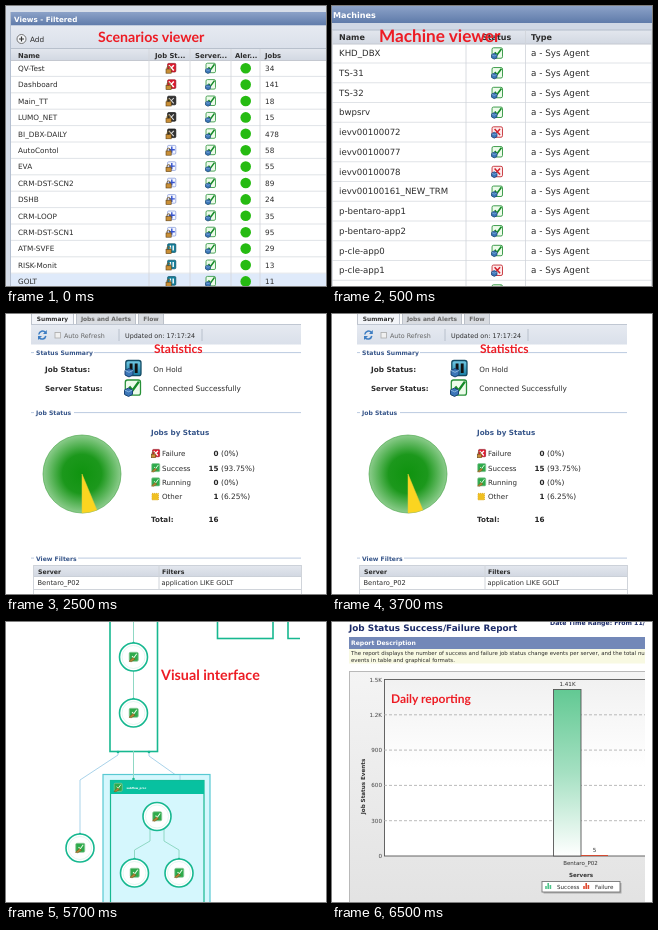
An HTML page for the animation above (8000 ms loop, 320 px wide and 280 px high).

```html
<!DOCTYPE html>
<html lang="en">
<head>
<meta charset="utf-8">
<style>
html, body { margin: 0; width: 100%; height: 100%; overflow: hidden; background: #fff; }
svg { display: block; width: 320px; height: 280px; }
text { font-family: "DejaVu Sans", sans-serif; text-rendering: geometricPrecision; white-space: pre; }
.b { font-weight: bold; }
.cap { font-family: Lato, sans-serif; font-weight: bold; }
</style>
</head>
<body>
<svg id="stage" viewBox="0 0 320 280"></svg>
<script>
const rect = (x, y, w, h, fill, more = '') =>
  `<rect x="${x}" y="${y}" width="${w}" height="${h}" fill="${fill}" ${more}/>`;
const line = (x1, y1, x2, y2, color, more = '') =>
  `<path d="M${x1} ${y1}L${x2} ${y2}" stroke="${color}" fill="none" ${more}/>`;
const path = (d, color, width = 1, fill = 'none') =>
  `<path d="${d}" stroke="${color}" stroke-width="${width}" fill="${fill}"/>`;
const circle = (x, y, r, fill, more = '') =>
  `<circle cx="${x}" cy="${y}" r="${r}" fill="${fill}" ${more}/>`;
const text = (x, y, size, s, fill = '#2c2c2c', more = '') =>
  `<text x="${x}" y="${y}" font-size="${size}" fill="${fill}" ${more}>${s}</text>`;
const bold = (x, y, size, s, fill = '#2c2c2c', more = '') => text(x, y, size, s, fill, 'class="b" ' + more);
const caption = (x, y, size, s) => text(x, y, size, s, '#ed1c24', 'class="cap"');
const icon = (id, x, y, scale = 1) => `<use href="#${id}" transform="translate(${x} ${y}) scale(${scale})"/>`;
const mid = 'text-anchor="middle"', end = 'text-anchor="end"';

const stops = colors =>
  colors.map((c, i) => `<stop offset="${i / (colors.length - 1)}" stop-color="${c}"/>`).join('');
const gradient = (id, ...colors) => `<linearGradient id="${id}" x2="0" y2="1">${stops(colors)}</linearGradient>`;

// Icons are centred on 0,0 and about 10 px wide.
const tile = (fill, edge) => rect(-4.5, -5, 9.5, 9.5, fill, `rx="1.4" stroke="${edge}" stroke-width=".8"`);
const lockTile = (fill, edge) => rect(-3.4, -4.8, 8.2, 8.6, fill, `rx="1" stroke="${edge}" stroke-width=".7"`);
const lock = path('M-4 1V-.4a1.6 1.6 0 0 1 3.2 0V1', '#7a5c22', .9) +
  rect(-5, .8, 5.2, 4.2, '#c98f36', 'stroke="#5e3f12" stroke-width=".6"');
const cube = path('M-5 1.2L-2.5 0L0 1.2V4L-2.5 5.3L-5 4Z', '#173e70', .6, '#3c76b8') +
  path('M-5 1.2L-2.5 2.4L0 1.2', '#9cc4e8', .5);
const cross = 'M-2.2 -3L2.8 2.4M2.8 -3L-2.2 2.4';
const symbols = {
  failed: lockTile('#e0182d', '#8d1420') + path(cross, '#fff', 1.5) + lock,
  stopped: lockTile('#333', '#111') + path(cross, '#ddd', 1.1) + lock,
  idle: lockTile('#f4f7ff', '#7d92d6') + path('M.8 -3.6V2.6M-2.2 -.5H3.8', '#3453cf', 1.4) + lock,
  held: lockTile('#16809c', '#0b4c62') + path('M-.6 -3V2M2.2 -3V2', '#fff', 1.4) + lock,
  pause: tile('url(#teal)', '#124a63') + path('M-1.2 -3.2V2.8M2 -3.2V2.8', '#111', 1.8) + cube,
  up: tile('#edfbea', '#289138') + path('M-2 -1L0 1.5L4 -4', '#168a28', 1.5) + cube,
  down: tile('#fdeaea', '#c42b33') + path(cross, '#d3202c', 1.4) + cube,
  job: tile('#2eaa4b', '#8dc99a') + path('M-1.5 -1L.2 1L3.4 -3.4', '#e8ffe8', 1.1) +
    path('M-4.8 4.6L-.5 .6L1.6 2.4L-2.4 5Z', '#6b4a12', .5, '#b58436')
};

const defs = '<defs>' +
  gradient('bar', '#8ca2c8', '#5f7baa') +
  gradient('head', '#e3e7ee', '#d2d8e2') +
  gradient('tool', '#e6eaf1', '#dae0ea') +
  gradient('teal', '#75cce6', '#177ca3') +
  gradient('column', '#62c993', '#a5e0c2', '#fff') +
  gradient('plot', '#f1f1f1', '#fff', '#fff') +
  gradient('panel', '#f4f4f4', '#e2e2e2') +
  `<radialGradient id="pie">${stops(['#0f930f', '#1c981c', '#8ccc8c'])}</radialGradient>` +
  Object.entries(symbols).map(([id, s]) => `<g id="${id}">${s}</g>`).join('') +
  '<clipPath id="page"><path d="M16 0H313V280H16Z"/></clipPath></defs>';

function scenarios() {
  const rows = [
    ['QV-Test', 34, 'failed'], ['Dashboard', 141, 'failed'], ['Main_TT', 18, 'stopped'],
    ['LUMO_NET', 15, 'stopped'], ['BI_DBX-DAILY', 478, 'stopped'], ['AutoContol', 58, 'idle'],
    ['EVA', 55, 'idle'], ['CRM-DST-SCN2', 89, 'idle'], ['DSHB', 24, 'idle'], ['CRM-LOOP', 35, 'idle'],
    ['CRM-DST-SCN1', 95, 'idle'], ['ATM-SVFE', 29, 'held'], ['RISK-Monit', 13, 'held'], ['GOLT', 11, 'held']
  ];
  let s = rect(0, 0, 320, 280, '#d6dde8') + rect(4, 6, 316, 13.5, 'url(#bar)') +
    bold(8, 15.6, 7.2, 'Views - Filtered', '#fff') +
    rect(4, 19.5, 316, 23, 'url(#tool)') + rect(4, 42.5, 316, 12, 'url(#head)') +
    rect(4, 54.5, 316, 226, '#fff') + line(4, 42.5, 320, 42.5, '#b8c0cc') + line(4, 54.5, 320, 54.5, '#c4c8d0') +
    circle(15.5, 33, 4.5, '#f3f5f8', 'stroke="#666" stroke-width=".9"') +
    path('M13 33H18M15.5 30.5V35.5', '#333', 1.2) + text(24, 35.6, 7.3, 'Add');
  [[12, 'Name'], [149, 'Job St...'], [189, 'Server...'], [229, 'Aler...'], [259, 'Jobs']]
    .forEach(([x, h]) => s += bold(x, 51.5, 6.8, h));
  rows.forEach(([name, jobs, state], i) => {
    const y = 62.2 + i * 16.4;
    if (i == 13) s += rect(4, y - 7.7, 316, 16, '#dfeafa');
    s += line(4, y + 8.2, 320, y + 8.2, '#d9dce1', 'stroke-width=".8"') +
      text(12, y + 2.7, 7.3, name) + text(259, y + 2.7, 7.3, jobs) +
      icon(state, 165, y) + icon('up', 204.5, y) + circle(239.7, y, 5.3, '#26bb12');
  });
  [143, 184, 225, 254].forEach(x => s += line(x, 43, x, 280, '#d2d5da', 'stroke-width=".8"'));
  return s + line(4.5, 6, 4.5, 280, '#b4bfd0') + caption(92, 35.7, 14.2, 'Scenarios viewer');
}

function machines() {
  const names = ['KHD_DBX', 'TS-31', 'TS-32', 'bwpsrv', 'ievv00100072', 'ievv00100077', 'ievv00100078',
    'ievv00100161_NEW_TRM', 'p-bentaro-app1', 'p-bentaro-app2', 'p-cle-app0', 'p-cle-app1', 'p-cle-app2'];
  let s = rect(0, 0, 320, 280, '#fff') + rect(0, 0, 320, 17, 'url(#bar)') +
    bold(1, 11.5, 8.1, 'Machines', '#fff') + rect(0, 17, 320, 7, '#d0d8e5') +
    rect(0, 24, 320, 14, 'url(#head)') + line(0, 24, 320, 24, '#b4bdcb') + line(0, 38, 320, 38, '#c4c8d0');
  [[7, 'Name'], [150, 'Status'], [199, 'Type']].forEach(([x, h]) => s += bold(x, 34, 8, h));
  names.forEach((name, i) => {
    const y = 47 + i * 19.75;
    s += line(0, y + 10, 320, y + 10, '#d9dce1', 'stroke-width=".8"') + text(7, y + 3, 8.6, name) +
      text(199, y + 3, 8.8, 'a - Sys Agent') + icon([4, 6, 11].includes(i) ? 'down' : 'up', 165, y + .3, 1.1);
  });
  [134, 193.5, 319.5, .5].forEach(x => s += line(x, 24, x, 280, '#d0d4da', 'stroke-width=".8"'));
  return s + caption(47, 35.7, 17.2, 'Machine viewer');
}

function statistics() {
  const navy = '#37568a';
  const section = (y, name, w) => line(25, y - 2.4, 295, y - 2.4, '#a9bcd8', 'stroke-width=".8"') +
    rect(28, y - 5, w + 3, 6, '#fff') + bold(30, y, 6.1, name, navy);
  const tab = (x, w, fill, name, ink) => rect(x, -3, w, 13.5, fill, 'stroke="#b0b6c0" stroke-width=".8"') +
    bold(x + w / 2, 7, 5.9, name, ink, mid);
  let s = rect(0, 0, 320, 280, '#fff') + tab(70.5, 59, '#d9dce1', 'Jobs and Alerts', '#666') +
    tab(132.5, 25, '#d9dce1', 'Flow', '#666') + tab(25.5, 42, '#f3f5f9', 'Summary', '#333') +
    rect(25, 10.5, 270, 20, 'url(#tool)') + line(25, 10.5, 295, 10.5, '#c0c7d2') +
    path('M32.8 20.5A3.8 3.8 0 0 1 39.5 18.5M39.8 22A3.8 3.8 0 0 1 33 23.5', '#3d7dc2', 1.5) +
    path('M40.8 16V20H37ZM32 26V22H36Z', 'none', 0, '#3d7dc2') +
    rect(49, 18.5, 5.5, 5.5, '#f0f0f0', 'stroke="#aaa" stroke-width=".8"') +
    text(58, 23.7, 6.35, 'Auto Refresh', '#666') + line(113, 15, 113, 27, '#b8c0cc') +
    text(119, 23.7, 6.4, 'Updated on: 17:17:24') + line(196, 15, 196, 27, '#b8c0cc') +
    section(41, 'Status Summary', 57) + section(101, 'Job Status', 37) + section(246.5, 'View Filters', 41) +
    bold(39, 58, 7.3, 'Job Status:') + bold(39, 77, 7.1, 'Server Status:') +
    icon('pause', 127, 54.5, 1.6) + icon('up', 126.5, 74, 1.6) +
    text(147.3, 58, 7.2, 'On Hold') + text(147.3, 77, 7.4, 'Connected Successfully') +
    circle(76, 160, 39, 'url(#pie)', 'stroke="#3f9f3f" stroke-width=".6"');
  const a = Math.PI * 3 / 8;
  s += path(`M76 160V199A39 39 0 0 0 ${76 + 39 * Math.cos(a)} ${160 + 39 * Math.sin(a)}Z`, '#e6c83a', .5, '#fbd520') +
    bold(145, 120.5, 7.2, 'Jobs by Status', navy);
  [['Failure', 0, '0%', 'failed'], ['Success', 15, '93.75%', 'job'], ['Running', 0, '0%', 'job'], ['Other', 1, '6.25%']]
    .forEach(([name, n, share, id], i) => {
      const y = 139.5 + i * 14.3;
      s += (id ? icon(id, 149.5, y, .85) : rect(146, y - 3, 6.5, 6.5, '#f0c020', 'stroke="#e0b030" stroke-dasharray="1"')) +
        text(156, y + 2.7, 7.1, name) + bold(212.5, y + 2.7, 7.2, n, '#222', end) +
        text(215, y + 2.7, 7.4, `(${share})`);
    });
  return s + bold(145, 208, 7.2, 'Total:') + bold(212.5, 208, 7.2, 16, '#222', end) +
    rect(27.5, 251.5, 268, 11, 'url(#head)', 'stroke="#c4cad3" stroke-width=".8"') +
    bold(32, 259.5, 6.2, 'Server') + bold(156, 259.5, 6.2, 'Filters') +
    text(31.5, 271, 6.7, 'Bentaro_P02') + text(155.5, 271, 6.6, 'application LIKE GOLT') +
    line(27, 275.5, 295, 275.5, '#d0d4da') + line(153, 251, 153, 276, '#d0d4da') +
    line(27.5, 251, 27.5, 280, '#d0d4da') + line(295.5, 251, 295.5, 280, '#d0d4da') +
    caption(148, 39.3, 12, 'Statistics');
}

function flow() {
  const green = '#17b890', link = '#8fd8c4', pale = '#a9d3ea';
  const frame = `stroke="${green}" stroke-width="1.6"`;
  const node = (x, y) => circle(x, y, 14, '#fff', frame) +
    circle(x, y, 11.5, 'none', 'stroke="#d7f2ea" stroke-width=".7"') + icon('job', x, y, .95);
  const dot = (x, y) => circle(x, y, 1.3, green);
  return rect(0, 0, 320, 280, '#fff') +
    rect(104, -5, 47.5, 134.5, '#fff', frame) + rect(211.5, -5, 55.5, 21.5, '#fff', frame) +
    path('M282 -2V16.5H294', green, 1.6) +
    path('M127.5 0V21M127.5 49V77', link) + dot(127.5, 21) + dot(127.5, 77) +
    path('M112 130V133L74 158V212', pale) + path('M143 130V134L174 156V158', pale) +
    rect(97, 152.5, 107, 140, '#d5f7fd', 'stroke="#58c9d2" stroke-width="1.2"') +
    path('M127.5 129V158', link) + path('M174 153V158', pale) +
    rect(104.5, 158.5, 93.5, 140, '#d5f7fd', `stroke="${green}" stroke-width="1.2"`) +
    rect(104.5, 158.5, 93.5, 13.5, '#08c1a0') + icon('job', 112, 165.5, .85) +
    bold(120.5, 166.7, 2.7, 'subflow_proc', '#fff') +
    path('M144 206V219L128.5 228V237M158 206V219L173 228V237', link) +
    dot(128.5, 237) + dot(173, 237) + dot(112, 130) + dot(143, 130) + dot(127.5, 157) + dot(74, 212) +
    node(127.5, 35) + node(127.5, 91) + node(74, 226) + node(151, 194.5) + node(128.5, 251) + node(173, 251) +
    caption(155, 57.5, 14.3, 'Visual interface');
}

function report() {
  const key = (x, color) => path(`M${x} 267V264M${x + 2.2} 267V261M${x + 4.4} 267V263`, color, 1.6);
  let s = rect(0, 0, 320, 280, '#fff') + '<g clip-path="url(#page)">' +
    bold(17, 8.7, 8.85, 'Job Status Success/Failure Report', '#1c2b68') +
    bold(218, 2.8, 6.2, 'Date Time Range: From 11/', '#1c2b68') +
    rect(17, 15, 296, 12, '#7388b8') + bold(19, 23.2, 6.1, 'Report Description', '#fff') +
    rect(17, 27, 296, 14.5, '#f8f9e2') +
    text(19, 33, 5.45, 'The report displays the number of success and failure job status change events per server, and the total number of') +
    text(19, 39.7, 5.45, 'events in table and graphical formats.') +
    rect(17.5, 49.5, 310, 240, 'url(#panel)', 'stroke="#b9b9b9"') +
    rect(52.5, 57.5, 270, 176.5, 'url(#plot)', 'stroke="#555" stroke-width=".9"');
  ['1.5K', '1.2K', '900', '600', '300', '0'].forEach((label, i) => {
    const y = 57.5 + i * 35.3;
    s += text(50, y + 2, 5.6, label, '#444', end);
    if (i % 5) s += line(52, y, 313, y, '#aaa', 'stroke-width=".8" stroke-dasharray="3 2"');
  });
  return s + rect(221.5, 67.5, 27.5, 166.5, 'url(#column)', 'stroke="#555" stroke-width=".9"') +
    line(249, 233.5, 276, 233.5, '#d34b32') +
    text(235.5, 64, 5.6, '1.41K', '#333', mid) + text(262.5, 230, 5.6, 5, '#333', mid) +
    text(248.5, 243, 5.5, 'Bentaro_P02', '#333', mid) + bold(249, 254.5, 5.6, 'Servers', '#333', mid) +
    bold(0, 0, 5.6, 'Job Status Events', '#333', mid + ' transform="translate(32.5 164.5) rotate(-90)"') +
    rect(211.5, 261, 78, 10.5, '#aaa') + rect(210, 259.5, 78, 10.5, '#fff', 'stroke="#777" stroke-width=".9"') +
    key(214, '#4fc48a') + text(225, 266.8, 5.6, 'Success') + key(252, '#e0492f') + text(263, 266.8, 5.6, 'Failure') +
    '</g>' + caption(59, 81, 12, 'Daily reporting');
}

const stage = document.getElementById('stage');
const scenes = [scenarios, machines, statistics, flow, report];
const cuts = [500, 2500, 4500, 6500, 8000];
stage.innerHTML = defs + scenes.map(draw => `<g class="scene">${draw()}</g>`).join('');
const groups = [...stage.querySelectorAll('.scene')];
const start = performance.now();

function show(now) {
  const t = Math.max(0, now - start) % 8000;
  const current = cuts.findIndex(c => t < c);
  groups.forEach((g, i) => g.style.display = i == current ? '' : 'none');
  requestAnimationFrame(show);
}
show(start);
</script>
</body>
</html>
```
